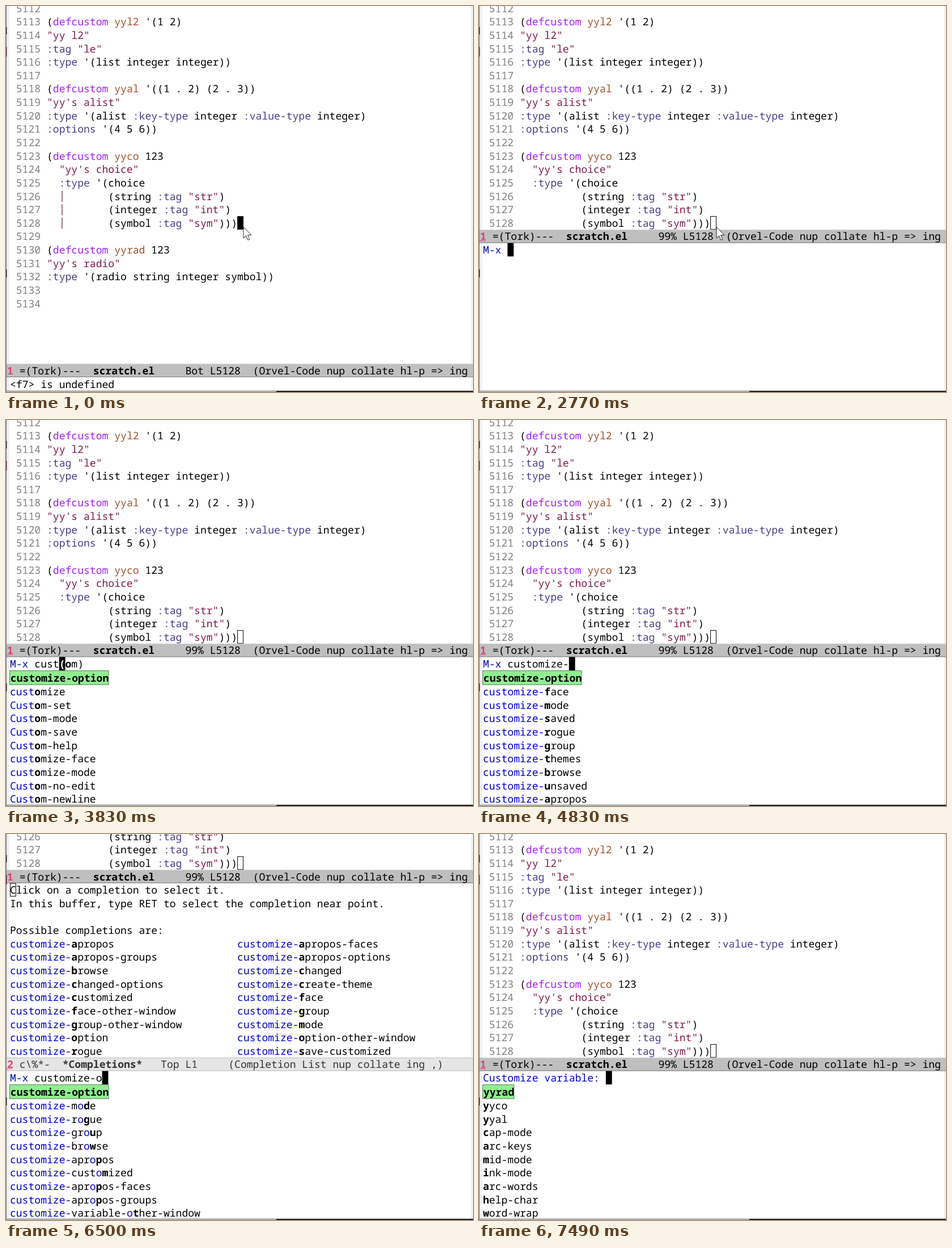
An HTML page for the animation above (8 s loop, 824 by 680 pixels).

```html
<!DOCTYPE html>
<html lang="en">
<head>
<meta charset="utf-8">
<title>Editor session</title>
<style>
  html, body { margin: 0; width: 100%; height: 100%; overflow: hidden; background: #fff; }
  svg { display: block; width: 824px; height: 680px; }
  text {
    font: 18.07px "Noto Sans Mono", "DejaVu Sans Mono", monospace;
    white-space: pre; text-rendering: geometricPrecision; fill: #000;
  }
  .num { fill: #808080; }
  .key { fill: #a020f0; }
  .var { fill: #a0522d; }
  .str { fill: #7c1a4c; }
  .tag { fill: #483d8b; }
  .hit { fill: #0000c8; }
  .ask { fill: #0010a8; }
  .dim { fill: #333; }
  .inv { fill: #fff; }
  .win { fill: #e0407c; font-weight: 600; }
  .b { font-weight: 700; }
</style>
</head>
<body>
<svg id="stage" viewBox="0 0 824 680" xmlns="http://www.w3.org/2000/svg"></svg>
<script>
const LOOP = 8000, CW = 10.842, RH = 23.64, LEFT = 6.95;
const stage = document.getElementById('stage');

const code = `
(defcustom yyl2 '(1 2)
"yy l2"
:tag "le"
:type '(list integer integer))

(defcustom yyal '((1 . 2) (2 . 3))
"yy's alist"
:type '(alist :key-type integer :value-type integer)
:options '(4 5 6))

(defcustom yyco 123
  "yy's choice"
  :type '(choice
          (string :tag "str")
          (integer :tag "int")
          (symbol :tag "sym")))

(defcustom yyrad 123
"yy's radio"
:type '(radio string integer symbol))

`.split('\n');

const cz = s => s.split(' ').map(w => 'customize-' + w);
const lists = {
  all: 'customize-option eval-buffer find-file compile apropos calendar shell grep occur rename-buffer'.split(' '),
  c: 'customize-option compile calendar calculator customize copy-file count-words clone-buffer capitalize-word center-line'.split(' '),
  custom: 'customize-option customize Custom-set Custom-mode Custom-save Custom-help customize-face customize-mode Custom-no-edit Custom-newline'.split(' '),
  ize: ['customize-option', 'customize', ...cz('face mode saved rogue group themes browse unsaved')],
  dash: cz('option face mode saved rogue group themes browse unsaved apropos'),
  o: cz('option mode rogue group browse apropos customized apropos-faces apropos-groups variable-other-window'),
  op: cz('option apropos apropos-faces apropos-groups changed-options apropos-options option-other-window'),
  opt: cz('option changed-options apropos-options option-other-window'),
  vars: 'yyrad yyco yyal cap-mode arc-keys mid-mode ink-mode arc-words help-char word-wrap'.split(' ')
};
const leftCol = cz('apropos apropos-groups browse changed-options customized face-other-window group-other-window option rogue');
const rightCol = cz('apropos-faces apropos-options changed create-theme face group mode option-other-window save-customized');

// each step holds from its time t until the next one
const MX = 'M-x ', VAR = 'Customize variable: ';
const mx = (t, typed, list, hint, view = 'mini') => ({ t, view, ask: MX, typed, list, hint });
const steps = [
  { t: 0, view: 'home', echo: '<f7> is undefined', guides: 1, mouse: 1 },
  { t: 660, view: 'home', echo: '', guides: 1, mouse: 1 },
  { t: 1650, view: 'home', echo: 'ESC-', guides: 1, mouse: 1 },
  { t: 1910, view: 'home', ask: MX, mouse: 1 },
  { t: 1980, view: 'home', ask: MX, guides: 1, mouse: 1 },
  { t: 2770, view: 'mini', ask: MX, mouse: 1 },
  { t: 2840, view: 'mini', ask: MX, list: 'all', mouse: 1 },
  mx(3300, 'c', 'c'),
  mx(3430, 'cu', 'custom'),
  mx(3560, 'cus', 'custom', 'tom'),
  mx(3830, 'cust', 'custom', 'om'),
  mx(3900, 'custo', 'custom', 'm'),
  mx(4170, 'custom', 'custom'),
  mx(4440, 'customi', 'ize', 'ze'),
  mx(4570, 'customiz', 'ize', 'e'),
  mx(4700, 'customize', 'ize'),
  mx(4830, 'customize-', 'dash'),
  mx(5560, 'customize-', 'dash', undefined, 'comp'),
  mx(6500, 'customize-o', 'o', undefined, 'comp'),
  mx(6630, 'customize-op', 'op', undefined, 'comp'),
  mx(6760, 'customize-opt', 'opt', 'ion', 'comp'),
  mx(6890, 'customize-opti', 'opt', 'on', 'comp'),
  mx(7090, 'customize-optio', 'opt', 'n', 'comp'),
  mx(7220, 'customize-option', 'opt', '', 'comp'),
  { t: 7420, view: 'mini', ask: VAR },
  { t: 7490, view: 'mini', ask: VAR, list: 'vars' }
];

const esc = s => s.replace(/&/g, '&amp;').replace(/</g, '&lt;');
const rowY = row => row * RH - 8;
const colX = col => LEFT + col * CW;
const rect = (x, y, w, h, fill, more = '') =>
  `<rect x="${x}" y="${y}" width="${w}" height="${h}" fill="${fill}" ${more}/>`;
const line = (row, segs, x = LEFT, dy = 0) =>
  `<text x="${x}" y="${row * RH + 10.6 + dy}">` +
  segs.map(([s, c = '']) => `<tspan class="${c}">${esc(s)}</tspan>`).join('') + '</text>';
const block = (row, col) => rect(colX(col), rowY(row), CW, RH, '#000');
const hollow = (row, col) =>
  rect(colX(col) + .5, rowY(row) + .5, CW - 1, RH - 1, 'none', 'stroke="#000"');

function paint(src) {
  const segs = [];
  for (const [s] of src.matchAll(/"[^"]*"|:[\w-]+|defcustom|yy\w+|[^":dy]+|./g)) {
    const c = s[0] === '"' ? 'str' : /^:\w/.test(s) ? 'tag' :
      s === 'defcustom' ? 'key' : /^yy/.test(s) ? 'var' : '';
    segs.push([s, c]);
  }
  return segs;
}

function buffer(first, rows) {
  let out = '';
  for (let r = 0; r < rows && code[first + r] !== undefined; r++)
    out += line(r, [[` ${5112 + first + r} `, 'num'], ...paint(code[first + r])]);
  return out;
}

function bar(row, fill, light, dark, segs) {
  const y = rowY(row);
  return rect(1, y, 823, RH, fill) + rect(1, y, 823, 1, light) +
    rect(1, y + RH - 1, 823, 1, dark) + line(row, segs, 2.1);
}
const mainBar = (row, pos) => bar(row, '#bfbfbf', '#d4d4d4', '#7c7c7c', [
  ['1', 'win'], [' =(Tork)---  '], ['scratch.el', 'b'],
  [`     ${pos} L5128  (Orvel-Code nup collate hl-p => ing`]
]);

// matched parts in blue, the next letter bold
function marked(name, typed) {
  const head = typed.slice(0, 10), tail = typed.slice(10);
  const at = tail ? name.indexOf(tail, 10) : head.length;
  const end = at + tail.length;
  return [
    [name.slice(0, head.length), 'hit'], [name.slice(head.length, at)],
    [name.slice(at, end), 'hit'], [name.slice(end, end + 1), 'b'], [name.slice(end + 1)]
  ];
}

function candidates(names, typed) {
  const w = names[0].length * CW + 1;
  return rect(LEFT - .4, rowY(19) + .5, w, RH + 1, '#90ee90', 'stroke="#5f7f5f"') +
    line(19, [[names[0], 'b']], LEFT + .9, .9) +
    names.slice(1).map((n, i) => line(20 + i, marked(n, typed), LEFT, 1.8)).join('');
}

function prompt(row, { ask, typed = '', hint }) {
  const col = ask.length + typed.length;
  const segs = [[ask, ask === MX ? 'ask' : 'hit'], [typed]];
  if (hint !== undefined)
    segs.push(['(', 'inv b'], [hint.slice(0, 1), 'b'], [hint.slice(1) + ')']);
  return block(row, col) + line(row, segs);
}

function completions() {
  return line(4, [['Click on a completion to select it.']]) +
    line(5, [['In this buffer, type RET to select the completion near point.']]) +
    line(7, [['Possible completions are:']]) +
    leftCol.map((n, i) => line(8 + i, marked(n, 'customize-')) +
      line(8 + i, marked(rightCol[i], 'customize-'), colX(37))).join('') +
    hollow(4, 0) +
    bar(17, '#e5e5e5', '#bfbfbf', '#bfbfbf', [
      ['2', 'win'], [' c\\%*-  ', 'dim'], ['*Completions*', 'dim b'],
      ['   Top L1     (Completion List nup collate ing ,)', 'dim']
    ]);
}

const guides = () => [14, 15, 16].map(r => rect(98.2, rowY(r) + 2.6, 1.4, 19.5, '#7c3a50')).join('');
const mouse = '<path d="M419 389.3v19.6l4.5-4.2 3.3 7.6 3.1-1.3-3.3-7.4h6.3z" fill="#fff" stroke="#222" stroke-width="1"/>';
const backdrop = rect(0, 0, 824, 680, '#fff') + rect(1, 0, 5, 678, '#f2f2f2') + rect(820.5, 0, 3.5, 678, '#efefef');
const edges = rect(0, 0, 1.2, 680, '#858585') +
  rect(0, 37, 1.3, 13, '#111') + rect(0, 72, 1.3, 17, '#5a1830') + rect(0, 464, 1.3, 14, '#111') +
  rect(0, 677.6, 824, 1, '#777') + rect(0, 678.6, 477, 1.4, '#aaa') + rect(477, 678.2, 347, 1.8, '#111');

function scene(s) {
  let out = backdrop;
  if (s.view === 'home') {
    out += buffer(0, 27) + block(16, 37) + mainBar(27, 'Bot');
    out += s.ask ? prompt(28, s) : line(28, [[s.echo]]);
  } else {
    out += s.view === 'comp'
      ? buffer(14, 3) + hollow(2, 37) + mainBar(3, '99%') + completions()
      : buffer(0, 17) + hollow(16, 37) + mainBar(17, '99%');
    out += rect(1, 413, 10.5, 1, '#e0407c') + prompt(18, s);
    if (s.list) out += candidates(lists[s.list], s.typed || '');
  }
  if (s.guides) out += guides();
  return out + edges + (s.mouse ? mouse : '');
}

let shown = null;
const start = performance.now();
function tick() {
  const t = (performance.now() - start) % LOOP;
  const s = steps.findLast(k => k.t <= t) || steps[0];
  if (s !== shown) {
    stage.innerHTML = scene(s);
    shown = s;
  }
  requestAnimationFrame(tick);
}
tick();
</script>
</body>
</html>
```
